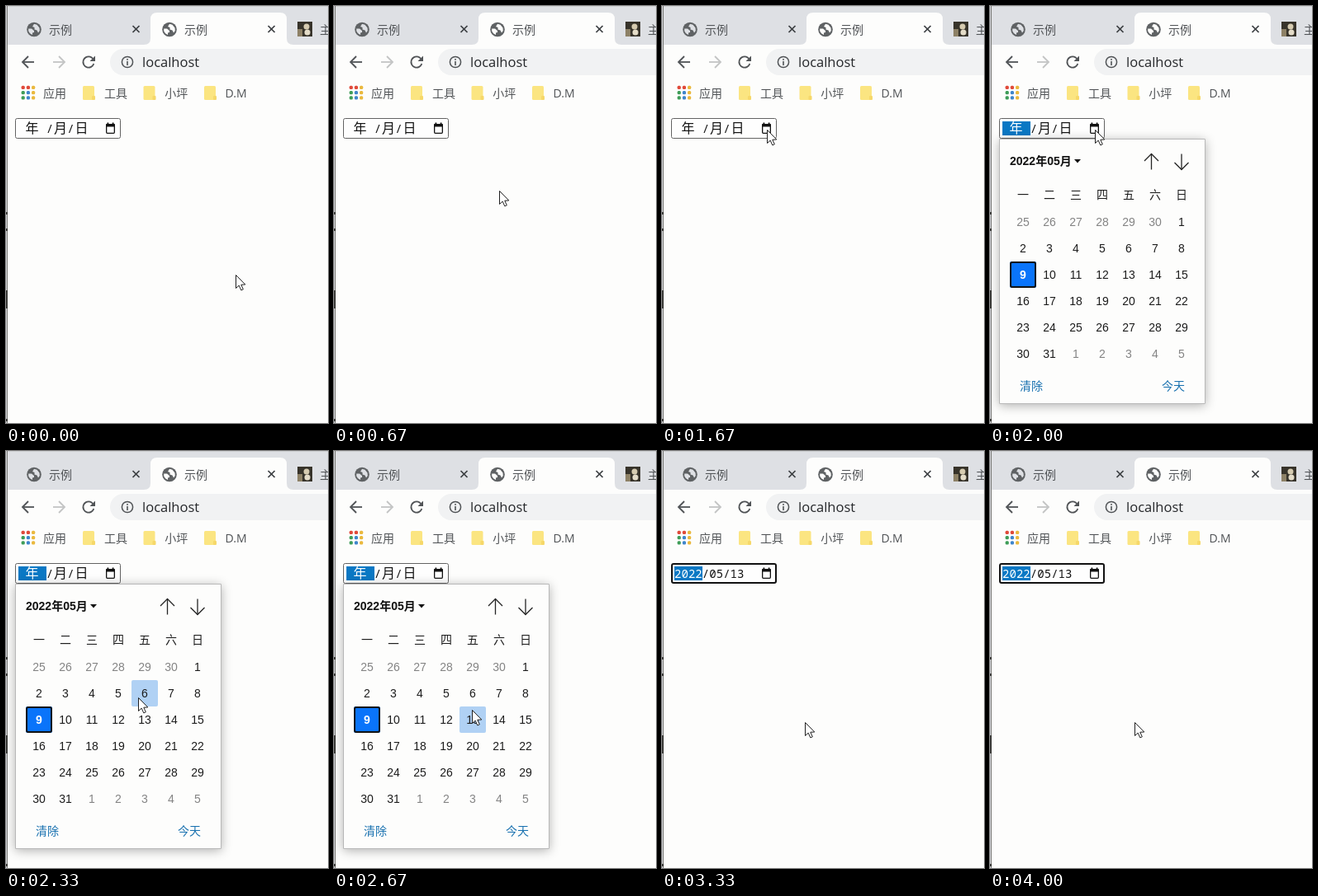
Recreate the animation shown at these times as an HTML page with a canvas. Size 390x506 px, loop 4.33 s.

```html
<!DOCTYPE html>
<html lang="zh">
<head>
<meta charset="utf-8">
<title>示例</title>
<style>
html, body { margin: 0; width: 100%; height: 100%; overflow: hidden; background: #fdfdfc; }
canvas { display: block; width: 390px; height: 506px; }
</style>
</head>
<body>
<canvas id="stage"></canvas>
<script>
const W = 390, H = 506, LOOP = 4330;
const canvas = document.getElementById('stage');
const g = canvas.getContext('2d');
const scale = window.devicePixelRatio || 1;
canvas.width = W * scale;
canvas.height = H * scale;

const UI = '"Open Sans", "Noto Sans CJK SC", "Noto Sans CJK", sans-serif';
const DIGITS = '"Liberation Sans", "Noto Sans CJK SC", "Noto Sans CJK", sans-serif';
const MONO = '"Noto Sans Mono", "Noto Sans CJK SC", monospace';
const PAGE = '#fdfdfc', STRIP = '#dee0e4', INK = '#505356', BLACK = '#121212', BLUE = '#0a78c4';

const path = [
  [278, 326], [239, 275], [200, 224], [161, 173], [140, 158], [127, 150], [127, 150],
  [160, 299], [167, 314], [173, 329], [173, 329], [173, 329], [175, 329]
];
const OPEN = 6, PICKED = 10;
const stepStart = i => Math.round(i * 100 / 3) * 10;

function box(x, y, w, h, color, r = 0) {
  g.fillStyle = color;
  g.beginPath();
  g.roundRect(x, y, w, h, r);
  g.fill();
}

function frame(x, y, w, h, color, width, r = 0) {
  g.strokeStyle = color;
  g.lineWidth = width;
  g.beginPath();
  g.roundRect(x + width / 2, y + width / 2, w - width, h - width, r);
  g.stroke();
}

function dot(x, y, r, color) {
  g.fillStyle = color;
  g.beginPath();
  g.arc(x, y, r, 0, Math.PI * 2);
  g.fill();
}

function ring(x, y, r, color, width, from = 0, to = Math.PI * 2) {
  g.strokeStyle = color;
  g.lineWidth = width;
  g.beginPath();
  g.arc(x, y, r, from, to);
  g.stroke();
}

function trace(points) {
  g.beginPath();
  points.forEach(([x, y], i) => i ? g.lineTo(x, y) : g.moveTo(x, y));
}

function line(points, color, width) {
  trace(points);
  g.strokeStyle = color;
  g.lineWidth = width;
  g.stroke();
}

function shape(points, color) {
  trace(points);
  g.closePath();
  g.fillStyle = color;
  g.fill();
}

function text(str, x, y, font, color, align = 'left') {
  g.font = font;
  g.fillStyle = color;
  g.textAlign = align;
  g.fillText(str, x, y);
}

function globe(x, y, land) {
  dot(x, y, 8.8, '#5f6264');
  g.save();
  g.translate(x, y);
  shape([[-6.8, -1], [-3, -1], [0, 1.5], [0, 3.5], [-2, 4], [-2, 6.5], [-5, 4.8], [-6.8, 2]], land);
  shape([[0, -6.8], [3.5, -5.8], [6.5, -2], [6.8, 1.5], [5, 4], [3.5, 1], [0.5, 0], [0.5, -2.5], [-2, -3.5]], land);
  g.restore();
}

function cross(x, y, color) {
  line([[x - 4, y - 4], [x + 4, y + 4]], color, 1.7);
  line([[x + 4, y - 4], [x - 4, y + 4]], color, 1.7);
}

function sideArrow(x, dir, color) {
  line([[x - 7 * dir, 68], [x + 7 * dir, 68]], color, 1.8);
  line([[x, 61], [x + 7 * dir, 68], [x, 75]], color, 1.8);
}

function folder(x) {
  box(x, 97, 14, 17, '#fbe581', 1.5);
  box(x + 11, 109, 4, 5, '#f6d86a', 1);
}

function tabs() {
  box(0, 0, W, 47, STRIP);
  box(0, 0, W, 1, '#cfd0d2');
  g.fillStyle = PAGE;
  g.beginPath();
  g.moveTo(167, 47);
  g.quadraticCurveTo(175, 47, 175, 39);
  g.lineTo(175, 16);
  g.quadraticCurveTo(175, 8, 183, 8);
  g.lineTo(332, 8);
  g.quadraticCurveTo(340, 8, 340, 16);
  g.lineTo(340, 39);
  g.quadraticCurveTo(340, 47, 348, 47);
  g.fill();
  [[34, STRIP], [198, PAGE]].forEach(([x, land]) => {
    globe(x, 28.5, land);
    text('示例', x + 18, 34, '14px ' + UI, INK);
  });
  cross(157.5, 28, '#3c3f42');
  cross(321.5, 28, '#3c3f42');

  box(353, 19, 18, 18, '#37332a');
  box(353, 28, 6, 9, '#8d8166');
  dot(364, 25, 3.5, '#d6cbb0');
  dot(365, 32, 3.5, '#e4dcc8');
  text('主', 380, 34, '14px ' + UI, INK);
}

function toolbar() {
  sideArrow(27, -1, INK);
  sideArrow(64, 1, '#c3c4c4');
  ring(100, 68, 6.6, INK, 1.8, 0.3, Math.PI * 1.78);
  shape([[108, 60.5], [108, 67], [101.5, 67]], INK);

  box(126, 52, 300, 32, '#f1f2f3', 16);
  ring(147, 68, 6.6, INK, 1.5);
  box(146.2, 67, 1.6, 5, INK);
  box(146.2, 64, 1.6, 1.7, INK);
  text('localhost', 165, 74, '16.5px ' + UI, '#25272a');

  const [red, yellow, green, blue] = ['#e04a3a', '#eab93e', '#3f9d58', '#3f86cc'];
  [red, red, yellow, green, blue, yellow, green, blue, yellow].forEach((c, i) =>
    box(18.6 + i % 3 * 6.2, 96.8 + Math.floor(i / 3) * 6.2, 4.2, 4.2, c, 1.5));
  const font = '14px ' + UI;
  text('应用', 45, 111, font, INK);
  ['工具', '小坪', 'D.M'].forEach((label, i) => {
    folder(93 + i * 73.5);
    text(label, 119 + i * 73.3, 111, font, INK);
  });
}

function windowEdge() {
  box(0, 0, 1, H, '#d6d7dc');
  box(1, 0, 1, H, '#7b7b78');
  for (const [y, h] of [[250, 3], [270, 3], [345, 22], [501, 3]]) {
    box(0, y, 2, h, '#3c3c3a');
  }
}

function dateInput(step) {
  const open = step >= OPEN && step < PICKED;
  const picked = step >= PICKED;
  box(11, 136, 128, 25, '#fefefe', 2);
  if (picked) frame(11, 136, 128, 25, BLACK, 2, 2);
  else frame(11, 136, 128, 25, '#636363', 1, 2);

  if (open || picked) box(15, 140, 34, 17, BLUE);
  const mono = '14px ' + MONO;
  if (picked) {
    [...'2022/05/13'].forEach((c, i) =>
      text(c, 19.2 + i * 8.45, 154, mono, i < 4 ? '#fff' : BLACK, 'center'));
  } else {
    const cjk = '16px ' + MONO;
    text('年', 31.5, 154, cjk, open ? '#fff' : BLACK, 'center');
    text('月', 66, 154, cjk, BLACK, 'center');
    text('日', 91.5, 154, cjk, BLACK, 'center');
    text('/', 53, 154, mono, BLACK, 'center');
    text('/', 78.5, 154, mono, BLACK, 'center');
  }

  frame(121, 143, 11, 12, BLACK, 1.3, 1);
  box(121, 143, 11, 3.5, BLACK, 1);
  box(122.5, 141.5, 1.8, 2, BLACK);
  box(128.7, 141.5, 1.8, 2, BLACK);
}

function monthArrow(x, dir) {
  const tip = 189 + dir * 9.5;
  line([[x, 189 - dir * 9.5], [x, tip]], '#252525', 1.3);
  line([[x - 8.5, tip - dir * 8.5], [x, tip], [x + 8.5, tip - dir * 8.5]], '#252525', 1.3);
}

function calendar([px, py]) {
  g.save();
  g.shadowColor = 'rgba(0, 0, 0, .3)';
  g.shadowBlur = 12 * scale;
  g.shadowOffsetY = 2 * scale;
  box(11, 161, 250, 322, PAGE);
  g.restore();
  frame(11, 161, 250, 322, '#b8b8b8', 1);

  text('2022年05月', 24, 193, 'bold 14px ' + DIGITS, BLACK);
  shape([[102, 186], [110, 186], [106, 190.5]], BLACK);
  monthArrow(195.5, -1);
  monthArrow(232, 1);
  [...'一二三四五六日'].forEach((d, i) =>
    text(d, 40 + i * 32, 234, '14px ' + DIGITS, '#1d1d1d', 'center'));

  const hoverCol = Math.floor((px - 24) / 32), hoverRow = Math.floor((py - 246) / 32);
  for (let i = 0; i < 42; i++) {
    const col = i % 7, row = Math.floor(i / 7);
    const x = 24 + col * 32, y = 246 + row * 32;
    const day = i - 5;
    const inMonth = day > 0 && day <= 31;
    const label = day < 1 ? day + 30 : inMonth ? day : day - 31;
    const today = day === 9;
    if (col === hoverCol && row === hoverRow) box(x, y, 32, 32, '#b0d1f4', 2);
    if (today) {
      box(x, y, 32, 32, '#0a74fa', 2);
      frame(x, y, 32, 32, BLACK, 2, 2);
    }
    text(label, x + 16, y + 21, (today ? 'bold ' : '') + '14px ' + DIGITS,
      today ? '#fff' : inMonth ? '#1d1d1d' : '#848484', 'center');
  }
  text('清除', 36, 466, '14px ' + DIGITS, '#1a72b0');
  text('今天', 208, 466, '14px ' + DIGITS, '#1a72b0');
}

function pointer([x, y]) {
  const outline = [[0, 0], [0, 16], [3.7, 12.6], [6.3, 18.4], [8.8, 17.3], [6.3, 11.7], [11.3, 11.5]]
    .map(([a, b]) => [x + 0.5 + a, y + 0.5 + b]);
  shape(outline, '#fff');
  g.strokeStyle = '#202020';
  g.lineWidth = 1;
  g.stroke();
}

function draw(t) {
  let step = 0;
  while (step < path.length - 1 && stepStart(step + 1) <= t) step++;
  g.setTransform(scale, 0, 0, scale, 0, 0);
  box(0, 0, W, H, PAGE);
  tabs();
  toolbar();
  windowEdge();
  dateInput(step);
  if (step >= OPEN && step < PICKED) calendar(path[step]);
  pointer(path[step]);
}

const start = performance.now();
function tick() {
  draw((performance.now() - start) % LOOP);
  requestAnimationFrame(tick);
}
tick();
</script>
</body>
</html>
```
